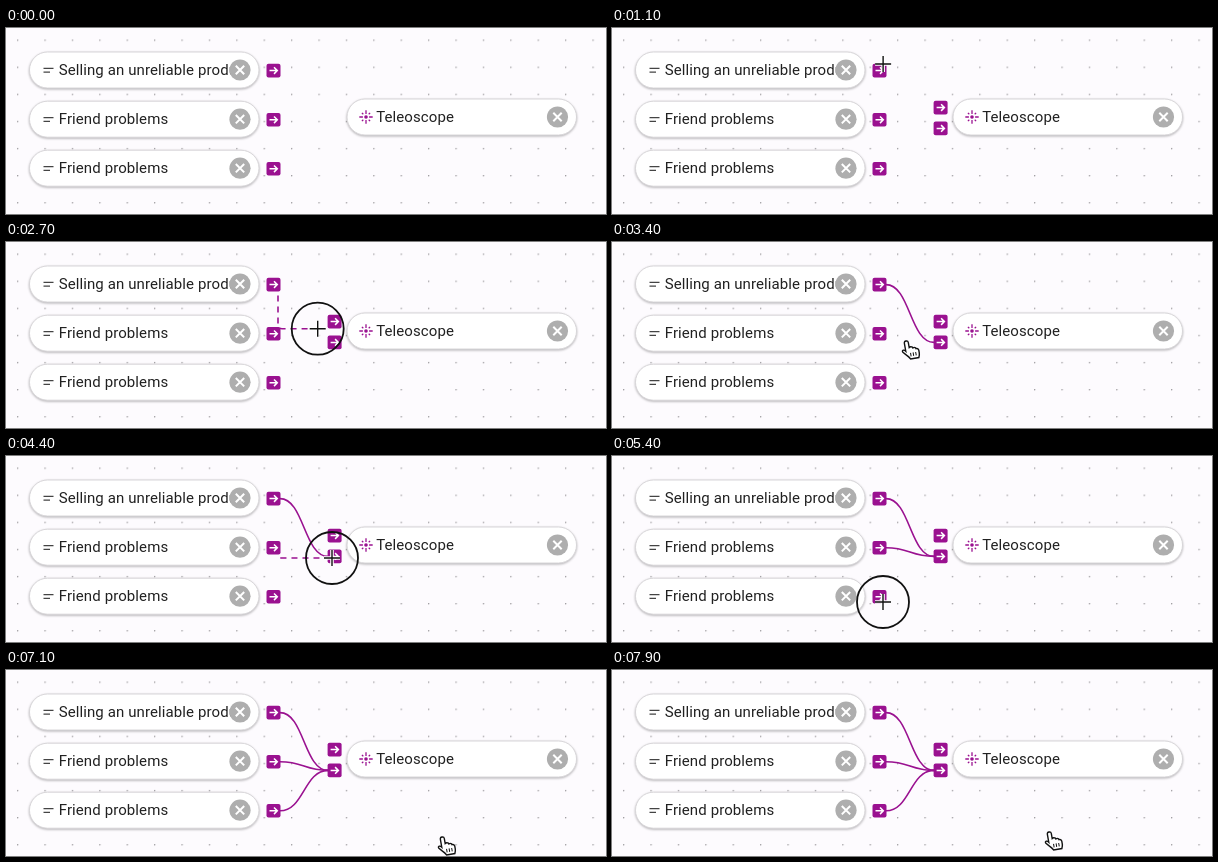
Recreate the animation shown at these times as an HTML page. Size 600 px wide and 186 px high, loop 8000 ms.

```html
<!DOCTYPE html>
<html lang="en">
<head>
<meta charset="utf-8">
<title>Connecting nodes</title>
<style>
  html, body { margin: 0; width: 100%; height: 100%; overflow: hidden; background: #fdfbfe; }
  svg { display: block; width: 600px; height: 186px; }
  text { font: 15px Roboto, Arial, sans-serif; letter-spacing: .1px; fill: #212121; }
  .pill { fill: #fff; stroke: #d8d6d9; filter: drop-shadow(0 1.5px 1.2px rgba(0, 0, 0, .28)); }
  .edge { fill: none; stroke: #9a1190; stroke-width: 1.6; }
  .white { fill: none; stroke: #fff; stroke-width: 1.5; }
  .flare { fill: none; stroke: #9a1190; stroke-width: 1.3; }
  .lines { fill: none; stroke: #444; stroke-width: 1.3; }
  .black { fill: none; stroke: #111; stroke-width: 1.4; }
</style>
</head>
<body>
<svg viewBox="0 0 600 186">
  <defs>
    <pattern id="dots" width="27.4" height="27.1" x="11" y="11.5" patternUnits="userSpaceOnUse">
      <circle cx=".7" cy=".7" r=".7" fill="#8c8a8d"/>
    </pattern>
    <clipPath id="label"><rect width="231" height="186"/></clipPath>
    <g id="close">
      <circle r="10.6" fill="#aeaeae"/>
      <path d="M-4.2-4.2 4.2 4.2M4.2-4.2-4.2 4.2" class="white" style="stroke-width:2"/>
    </g>
    <g id="port">
      <rect x="-7" y="-6.8" width="14" height="13.6" rx="2" fill="#9a1190"/>
      <path d="M-4 0H3.6M.5-3.3 3.8 0 .5 3.3" class="white"/>
    </g>
  </defs>
  <rect width="600" height="186" fill="url(#dots)"/>
  <g id="nodes"></g>
  <g id="edges"></g>
  <path id="drag" class="edge" stroke-dasharray="6 5"/>
  <g id="ports"></g>
  <g id="inputs">
    <use href="#port" x="328.6" y="79.6"/>
    <use href="#port" x="328.6" y="100.4"/>
  </g>
  <g id="cursor">
    <circle id="ring" r="26" class="black" style="stroke-width:1.8"/>
    <g id="cross">
      <path d="M-8 0H8M0-8V8" class="white" style="stroke-width:3.6"/>
      <path d="M-8 0H8M0-8V8" class="black"/>
    </g>
    <g id="hand" transform="rotate(-10)">
      <path d="M-2 2Q-2 0 0 0T2 2V7Q3 6.2 4.2 6.6 5.4 6.8 5.6 8 7 7.2 8.2 8.4 8.4 8.8 8.5 9.3 10.5 9 11 11V14Q11 16 9.8 18.5H1.5Q0 16-2 14L-5 10.5Q-5.8 9-4.5 8.6-3.2 8.4-2 10Z"
        class="black" style="fill:#fff"/>
      <path d="M2.4 12.5V16M5 12.5V16M7.6 12.5V16" class="black" style="stroke-width:1"/>
    </g>
  </g>
</svg>
<script>
  const LOOP = 8000, STEP = 100;
  const $ = id => document.getElementById(id);
  const show = (id, on) => $(id).setAttribute('visibility', on ? 'visible' : 'hidden');

  const flare = [0, 90, 180, 270].map(a =>
    `<path class="flare" transform="rotate(${a})" d="M3.1 0H6.7M2.7 2.7 4.1 4.1"/>`).join('') +
    '<circle r="1.8" fill="#9a1190"/>';
  const shortLines = '<path class="lines" d="M-5-1.6H5M-5 2.2H1.5"/>';

  function node(x, y, label, icon) {
    return `<rect class="pill" x="${x + .5}" y="${y - 18}" width="229.5" height="36" rx="18"/>
      <g transform="translate(${x + 19.5} ${y})">${icon}</g>
      <g ${x < 100 ? 'clip-path="url(#label)"' : ''}><text x="${x + 29.7}" y="${y + 5.2}">${label}</text></g>
      <use href="#close" x="${x + 211}" y="${y}"/>`;
  }

  const rows = [42, 91.2, 140.2];
  const titles = ['Selling an unreliable product', 'Friend problems', 'Friend problems'];
  const outs = rows.map(y => [267.5, y + .6]);
  const target = [328.6, 100.4];

  $('nodes').innerHTML = rows.map((y, i) => node(23, y, titles[i], shortLines)).join('') +
    node(340.5, 89, 'Teleoscope', flare);
  $('ports').innerHTML = outs.map(([x, y]) => `<use href="#port" x="${x}" y="${y}"/>`).join('');
  $('edges').innerHTML = outs.map(([, y], i) =>
    `<path id="edge${i}" class="edge" d="M274 ${y}C298 ${y} 298 100.4 322 100.4"/>`).join('');

  // Cursor path: time, x, y
  const path = [
    [100, 318, 184], [900, 280, 70], [1200, 268, 24], [1500, 268, 38], [1800, 268, 38],
    [2200, 268, 43], [2300, 268, 43], [2900, 327, 102], [3000, 327, 102], [3400, 294, 99],
    [3600, 271, 95], [3700, 271, 95], [4300, 326, 102], [4600, 326, 102], [5300, 271, 146],
    [5500, 271, 146], [6200, 328, 103], [6400, 328, 103], [7100, 436, 167], [7900, 437, 162]
  ];
  const drags = [[2300, 3000], [3600, 4500], [5400, 6300]];
  const within = (t, [a, b]) => t >= a && t < b;

  function position(t) {
    const i = path.findIndex(k => k[0] > t);
    if (i < 0) return path[path.length - 1].slice(1);
    if (i === 0) return path[0].slice(1);
    const [t0, x0, y0] = path[i - 1], [t1, x1, y1] = path[i];
    const p = (t - t0) / (t1 - t0), e = p * p * (3 - 2 * p);
    return [x0 + (x1 - x0) * e, y0 + (y1 - y0) * e];
  }

  function dragLine(row, x, y) {
    const sy = outs[row][1], r = Math.min(4, Math.abs(y - sy)) * Math.sign(y - sy);
    return `M272 ${sy}V${y - r}Q272 ${y} 276 ${y}H${x}`;
  }

  function draw(t) {
    const [x, y] = position(t);
    const row = drags.findIndex(d => within(t, d));
    const pressed = row >= 0 || within(t, [1800, 2200]);
    const near = [...outs, target].some(([px, py]) => Math.hypot(px - x, py - y) < 9);
    const crossed = pressed || near, visible = t >= 100;

    show('inputs', visible);
    drags.forEach((d, i) => show('edge' + i, t >= d[1]));
    const dragging = row >= 0 && x > 277;
    show('drag', dragging);
    if (dragging) $('drag').setAttribute('d', dragLine(row, x, y));
    $('cursor').setAttribute('transform', `translate(${x} ${y})`);
    show('ring', visible && pressed);
    show('cross', visible && crossed);
    show('hand', visible && !crossed);
  }

  const start = performance.now();
  function tick() {
    const t = (performance.now() - start) % LOOP;
    draw(Math.floor(t / STEP) * STEP);
    requestAnimationFrame(tick);
  }
  draw(0);
  requestAnimationFrame(tick);
</script>
</body>
</html>
```
